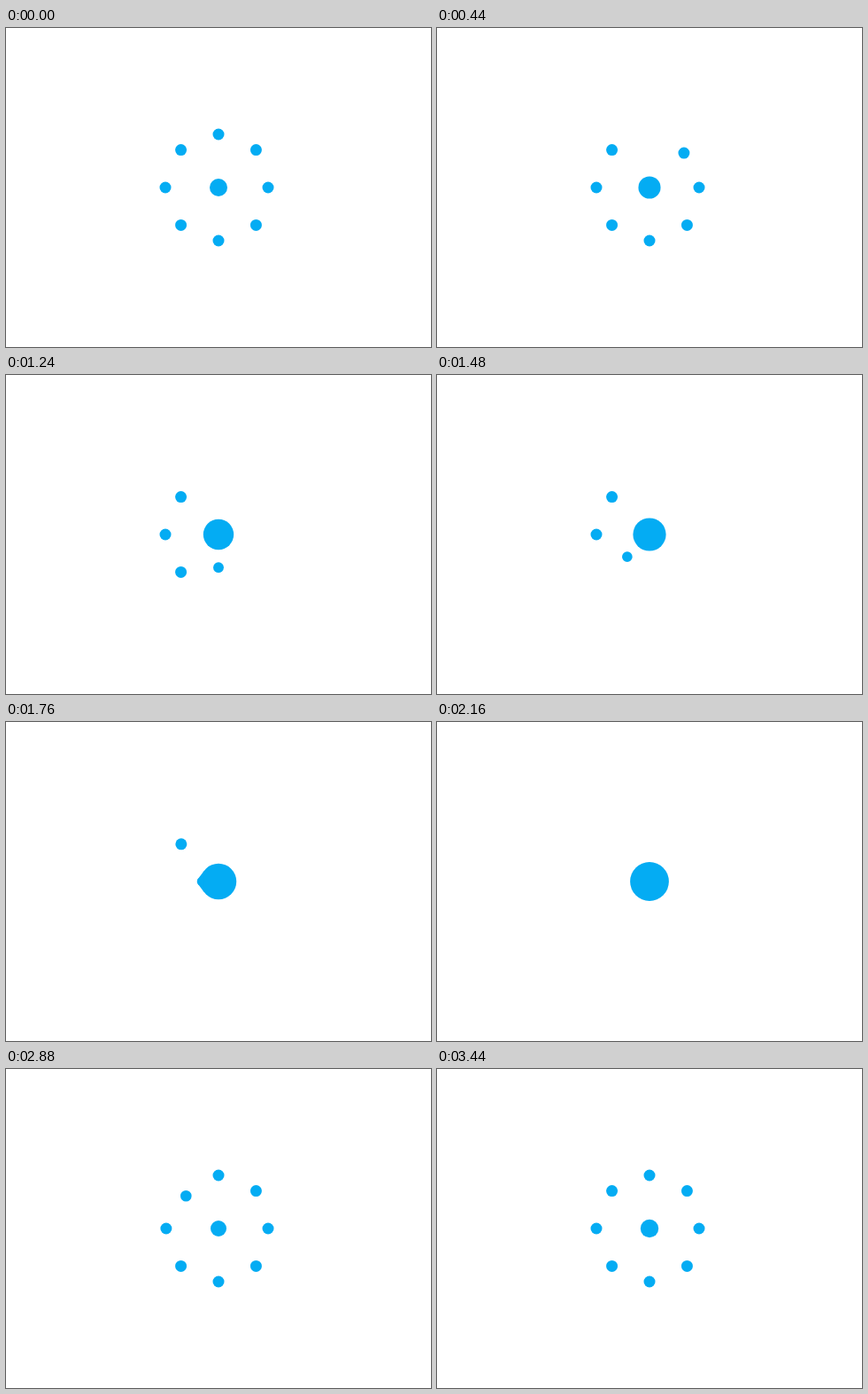
Recreate the animation shown at these times as an HTML page with a canvas. Size 480 px wide and 360 px high, loop 3.48 s.

```html
<!DOCTYPE html>
<html lang="en">
<head>
<meta charset="utf-8">
<title>Gooey loader</title>
<style>
  html, body { margin: 0; width: 100%; height: 100%; overflow: hidden; background: #fff; }
  canvas { display: block; }
</style>
</head>
<body>
<canvas id="stage" width="480" height="360"></canvas>
<script>
const ctx = document.getElementById('stage').getContext('2d');
const LOOP = 3480, STEP = 40;
const COUNT = 8, ORBIT = 60, RIGHT_ORBIT = 56, DOT = 6.5;
const GATHER = { start: 58, stagger: 234, length: 340 };
const SPREAD = { start: 2148, stagger: 83, length: 310 };

const clamp = v => Math.min(1, Math.max(0, v));
const mix = (a, b, u) => a + (b - a) * u;
const progress = (t, from, length) => clamp((t - from) / length);
const phase = (t, p, i) => progress(t, p.start + p.stagger * i, p.length);

function coreRadius(t) {
  if (t < SPREAD.start) return mix(10, 22.1, progress(t, 0, 2080));
  if (t < 2880) return mix(22.1, 9, progress(t, SPREAD.start, 732));
  const u = progress(t, 2880, 260);
  return mix(9, 10.2, u * u * (3 - 2 * u));
}

function dotState(t, i) {
  const orbit = i === 2 ? RIGHT_ORBIT : ORBIT;
  const out = phase(t, SPREAD, i);
  if (out > 0) {
    const p = 1 - (1 - out) ** 3;
    return { dist: orbit * p, r: Math.min(DOT, 2 + 5 * p) };
  }
  const p = phase(t, GATHER, i) ** 3;
  return { dist: orbit * (1 - p), r: DOT - 4 * p * p };
}

function circle(x, y, r) {
  ctx.beginPath();
  ctx.arc(x, y, r, 0, Math.PI * 2);
  ctx.fill();
}

// Sticky neck between the core and a dot lying on the x axis.
function neck(R, r, dist) {
  const pinch = clamp((dist - R - 1) / (r + 2));
  if (dist <= Math.abs(R - r) || pinch >= 1) return;
  const c = (R - r) / dist, s = Math.sqrt(1 - c * c);
  const midX = (R * c + dist + r * c) / 2;
  const midY = (R + r) / 2 * s * (1 - pinch);
  ctx.beginPath();
  ctx.moveTo(R * c, R * s);
  ctx.quadraticCurveTo(midX, midY, dist + r * c, r * s);
  ctx.lineTo(dist + r * c, -r * s);
  ctx.quadraticCurveTo(midX, -midY, R * c, -R * s);
  ctx.fill();
}

function draw(t) {
  ctx.fillStyle = '#fff';
  ctx.fillRect(0, 0, 480, 360);
  ctx.fillStyle = '#04acf3';
  ctx.save();
  ctx.translate(240, 180);
  const R = coreRadius(t);
  circle(0, 0, R);
  for (let i = 0; i < COUNT; i++) {
    const { dist, r } = dotState(t, i);
    if (dist + r <= R) continue;
    ctx.save();
    ctx.rotate(i * Math.PI / 4 - Math.PI / 2);
    circle(dist, 0, r);
    neck(R, r, dist);
    ctx.restore();
  }
  ctx.restore();
}

const begin = performance.now();
function tick() {
  const t = (performance.now() - begin) % LOOP;
  draw(Math.floor(t / STEP) * STEP);
  requestAnimationFrame(tick);
}
tick();
</script>
</body>
</html>
```
